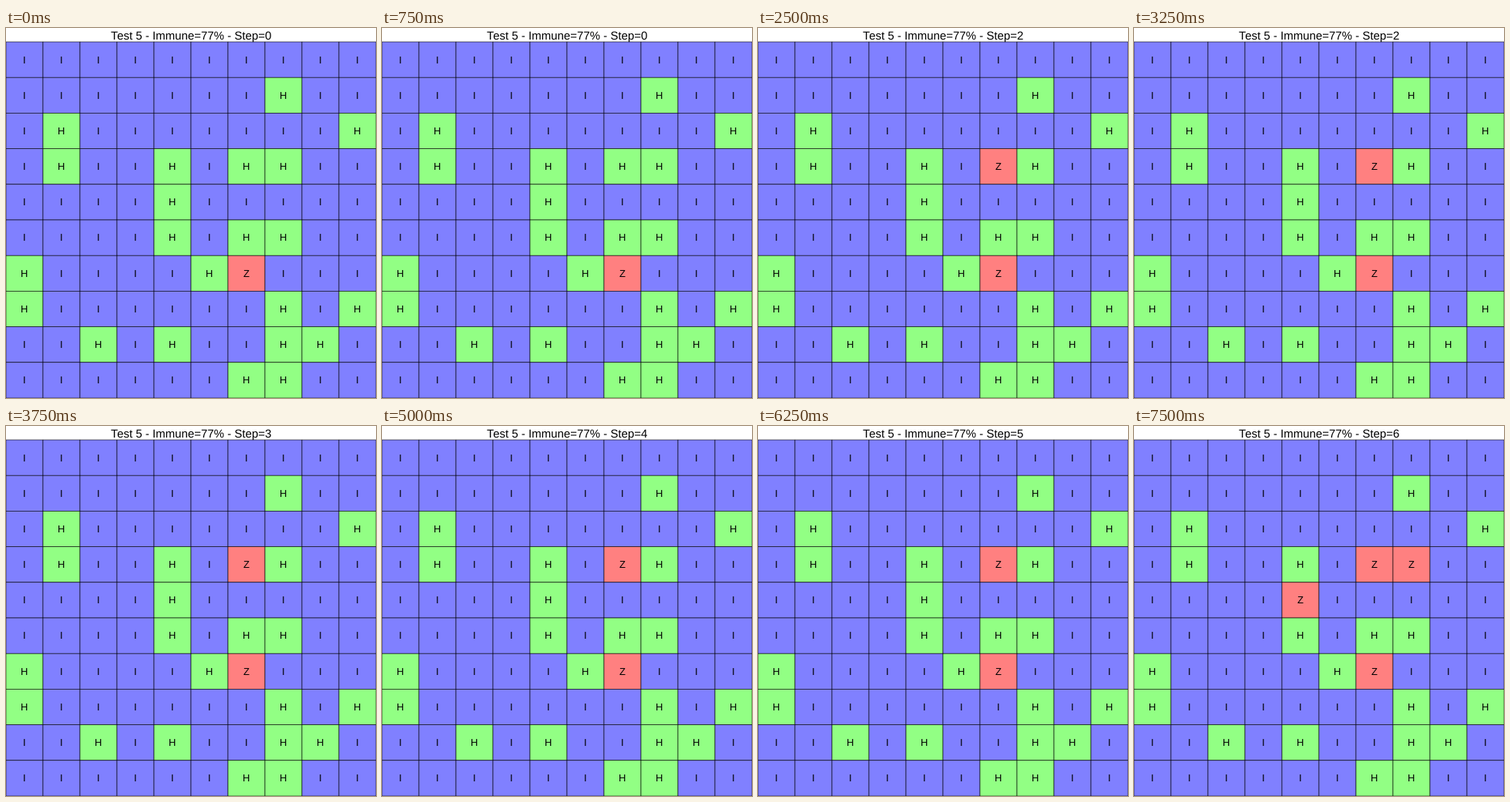
A matplotlib script that plays this animation: 480 by 480 pixels, repeating every 8 s.

```python
import math
import matplotlib.pyplot as plt
from matplotlib.animation import FuncAnimation
from matplotlib.patches import Rectangle

plt.rcParams["text.hinting"] = "none"
plt.rcParams["text.hinting_factor"] = 1

SIZE, DPI = 480, 100
N, TOP = 10, 18
CELL_W, CELL_H = SIZE / N, (SIZE - TOP) / N
FRAME_MS, FRAMES, FRAMES_PER_STEP = 250, 32, 5

COLORS = {"I": "#8080ff", "H": "#92ff84", "Z": "#ff8080"}
START = [
    "IIIIIIIIII",
    "IIIIIIIHII",
    "IHIIIIIIIH",
    "IHIIHIHHII",
    "IIIIHIIIII",
    "IIIIHIHHII",
    "HIIIIHZIII",
    "HIIIIIIHIH",
    "IIHIHIIHHI",
    "IIIIIIHHII",
]
# (row, column) -> step at which the cell turns
INFECTED = {(3, 6): 1, (3, 7): 6, (4, 4): 6}


def pt(px):
    return px * 72 / DPI


def state(row, col, step):
    if step >= INFECTED.get((row, col), math.inf):
        return "Z"
    return START[row][col]


fig = plt.figure(figsize=(SIZE / DPI, SIZE / DPI), dpi=DPI, facecolor="white")
ax = fig.add_axes([0, 0, 1, 1])
ax.set_xlim(0, SIZE)
ax.set_ylim(SIZE, 0)
ax.axis("off")


def label(x, y, text, px):
    return ax.text(x, y, text, fontsize=pt(px), family="Liberation Sans",
                   color="black", ha="center", va="baseline", zorder=3)


cells = {}
for row in range(N):
    for col in range(N):
        x, y = col * CELL_W, TOP + row * CELL_H
        # each cell strokes its own thin border, so shared edges come out darker
        box = ax.add_patch(Rectangle((x, y), CELL_W, CELL_H, lw=pt(0.6),
                                     edgecolor="black", snap=False))
        text = label(x + CELL_W / 2, y + CELL_H / 2 + 4.4, "", 13)
        cells[row, col] = box, text

title = label(SIZE / 2, 15, "", 15.1)


def update(frame):
    step = frame // FRAMES_PER_STEP
    title.set_text(f"Test 5 - Immune=77% - Step={step}")
    for (row, col), (box, text) in cells.items():
        kind = state(row, col, step)
        box.set_facecolor(COLORS[kind])
        text.set_text(kind)
    return []


anim = FuncAnimation(fig, update, frames=FRAMES, init_func=lambda: update(0),
                     interval=FRAME_MS, repeat=True, repeat_delay=0)
plt.show()
```
